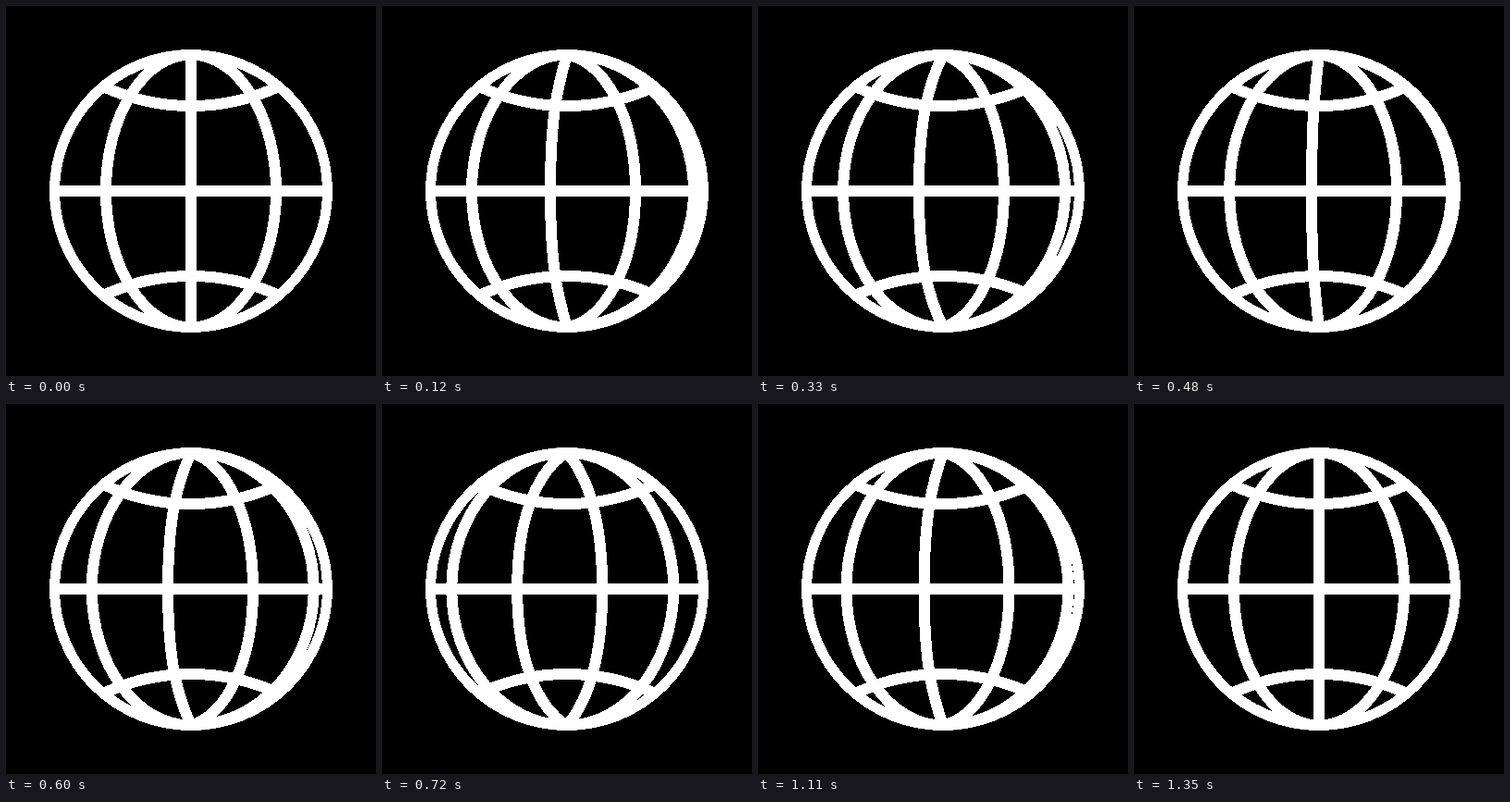
Animation, 400 px wide and 400 px high, one loop 3.41 s. Source, as an HTML page:

```html
<!DOCTYPE html>
<html lang="en">
<head>
<meta charset="utf-8">
<title>Spinning globe</title>
<style>
  html, body { margin: 0; width: 100%; height: 100%; overflow: hidden; background: #000; }
  svg { display: block; width: 100%; height: 100%; shape-rendering: crispEdges; }
  svg * { fill: none; stroke: #fff; stroke-width: 12; }
  #rim { stroke-width: 11; }
  #meridians { clip-path: url(#disc); }
</style>
</head>
<body>
<svg viewBox="0 0 400 400">
  <clipPath id="disc"><circle cx="200" cy="200" r="153"/></clipPath>
  <circle id="rim" cx="200" cy="200" r="147.5"/>
  <path d="M52.5 200H347.5"/>
  <path d="M105 87A225 225 0 0 0 295 87"/>
  <path d="M105 313A225 225 0 0 1 295 313"/>
  <g id="meridians"></g>
</svg>
<script>
const LOOP = 3410, SPIN = 1350, STEP = 30, TURNS = 7;
const C = 200, R = 147.5, EDGE = 148, INNER = 92;
const STOPS = [-EDGE, -INNER, 0, INNER, EDGE];
const EASE = { x1: 0.09, y1: 0, x2: 0.417, y2: 1 };
const ROUND = 0.5523;   // handle length of a quarter ellipse
const POINT = 42;       // vertical pole handle of the straight meridian

const group = document.getElementById('meridians');
const lines = STOPS.slice(1).map(() =>
  group.appendChild(document.createElementNS('http://www.w3.org/2000/svg', 'path')));

const cubic = (u, a, b) => 3 * u * (1 - u) * (1 - u) * a + 3 * u * u * (1 - u) * b + u * u * u;

function ease(x) {
  if (x <= 0) return 0;
  if (x >= 1) return 1;
  let lo = 0, hi = 1;
  for (let i = 0; i < 30; i++) {
    const mid = (lo + hi) / 2;
    if (cubic(mid, EASE.x1, EASE.x2) < x) lo = mid; else hi = mid;
  }
  return cubic(lo, EASE.y1, EASE.y2);
}

// Pole to pole, bulging by dx: a half ellipse that turns into a pointed lens near the middle
function meridian(dx) {
  const hx = C + dx * ROUND, x = C + dx;
  const hy = POINT * Math.max(0, 1 - Math.abs(dx) / INNER);
  const top = C - R, bottom = C + R, side = R * ROUND;
  return `M${C} ${top}C${hx} ${top + hy} ${x} ${C - side} ${x} ${C}` +
         `S${hx} ${bottom - hy} ${C} ${bottom}`;
}

function draw(ms) {
  const t = Math.floor((ms % LOOP) / STEP) * STEP;
  const shift = (TURNS * ease(t / SPIN)) % 1;
  lines.forEach((line, i) => {
    const dx = STOPS[i] + (STOPS[i + 1] - STOPS[i]) * shift;
    line.setAttribute('d', meridian(dx));
  });
}

const start = performance.now();
function tick() {
  draw(performance.now() - start);
  requestAnimationFrame(tick);
}
tick();
</script>
</body>
</html>
```
